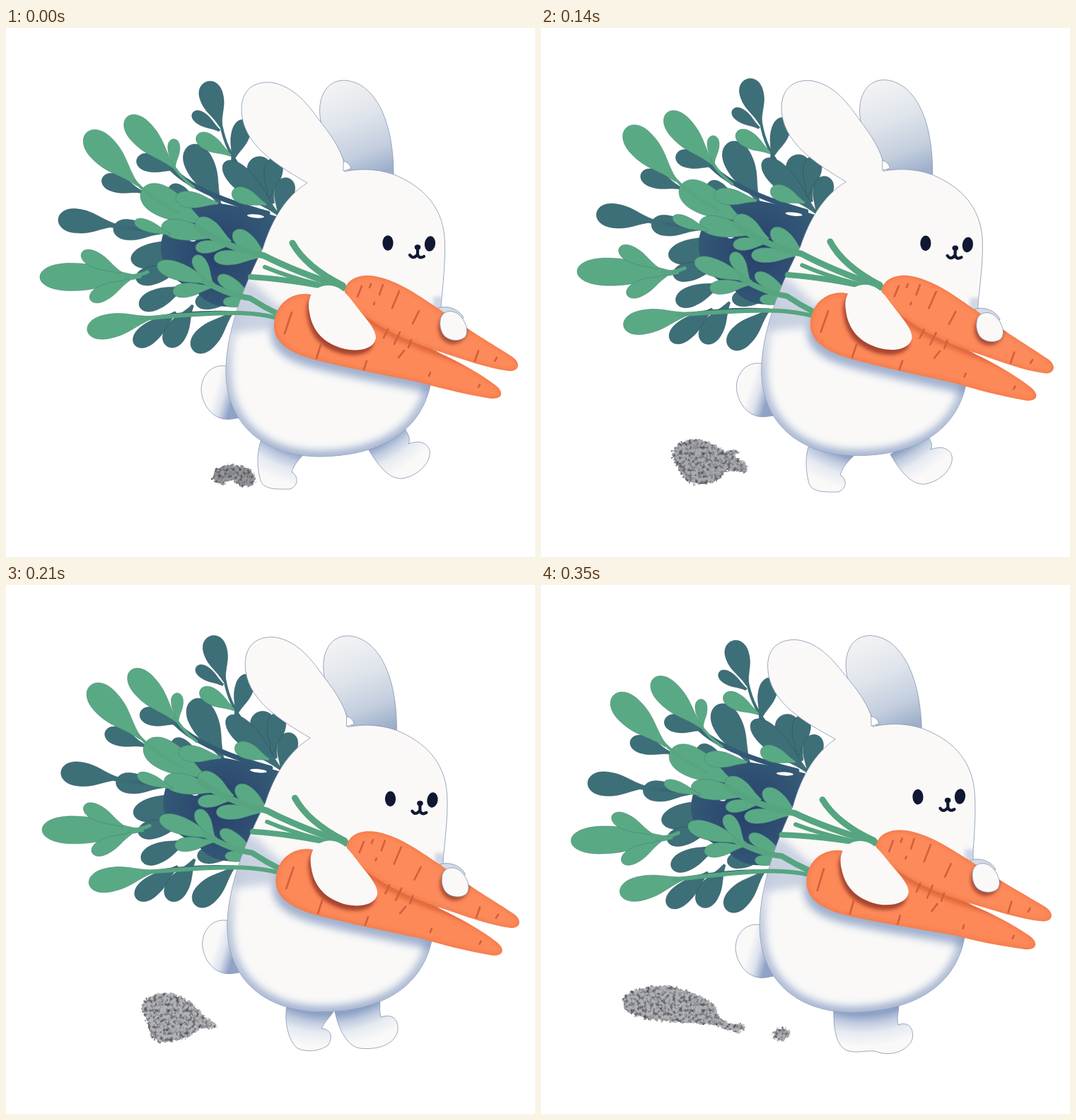
An HTML page for the animation above (420 ms loop, 748x748 px).

```html
<!DOCTYPE html>
<html lang="en">
<head>
<meta charset="utf-8">
<title>Bunny with carrots</title>
<style>
  html, body { margin: 0; width: 100%; height: 100%; overflow: hidden; background: #fff; }
  svg { display: block; width: 100vw; height: 100vh; }
  .edge { stroke: #8592ac; stroke-width: .8; }
  .mark { fill: none; stroke: #d0603c; stroke-width: 2.6; stroke-linecap: round; }
  .stem { fill: none; stroke-linecap: round; }
</style>
</head>
<body>
<svg viewBox="0 0 748 748">
  <defs>
    <radialGradient id="dark" gradientUnits="userSpaceOnUse" cx="300" cy="318" r="150">
      <stop offset="0" stop-color="#293f6d"/>
      <stop offset=".45" stop-color="#315474"/>
      <stop offset="1" stop-color="#3d6f78"/>
    </radialGradient>
    <radialGradient id="light" gradientUnits="userSpaceOnUse" cx="245" cy="225" r="130">
      <stop offset="0" stop-color="#4c9480"/>
      <stop offset=".35" stop-color="#57a581"/>
      <stop offset="1" stop-color="#5aa985"/>
    </radialGradient>
    <linearGradient id="earShade" gradientUnits="userSpaceOnUse" x1="470" y1="80" x2="520" y2="208">
      <stop offset="0" stop-color="#f2f2f4"/>
      <stop offset=".4" stop-color="#dfe4eb"/>
      <stop offset=".75" stop-color="#c3cede"/>
      <stop offset="1" stop-color="#9dafca"/>
    </linearGradient>
    <linearGradient id="tailShade" gradientUnits="userSpaceOnUse" x1="276" y1="508" x2="322" y2="522">
      <stop offset=".4" stop-color="#faf9f8"/>
      <stop offset=".7" stop-color="#dde3ed"/>
      <stop offset="1" stop-color="#8fa3c6"/>
    </linearGradient>
    <radialGradient id="legShade" gradientUnits="userSpaceOnUse" cx="455" cy="455" r="198">
      <stop offset=".77" stop-color="#8ea2c7"/>
      <stop offset=".83" stop-color="#bfcbdf"/>
      <stop offset=".9" stop-color="#e6eaf1"/>
      <stop offset="1" stop-color="#faf9f8"/>
    </radialGradient>
    <linearGradient id="rim" gradientUnits="userSpaceOnUse" x1="0" y1="380" x2="0" y2="600">
      <stop offset="0" stop-color="#9fb0ce" stop-opacity="0"/>
      <stop offset=".5" stop-color="#9fb0ce" stop-opacity=".75"/>
      <stop offset="1" stop-color="#9fb0ce"/>
    </linearGradient>
    <filter id="soft" x="-20%" y="-20%" width="140%" height="140%"><feGaussianBlur stdDeviation="6"/></filter>
    <filter id="softer" x="-20%" y="-20%" width="140%" height="140%"><feGaussianBlur stdDeviation="2.5"/></filter>
    <filter id="grain" x="-10%" y="-10%" width="120%" height="120%" color-interpolation-filters="sRGB">
      <feTurbulence type="fractalNoise" baseFrequency=".22" numOctaves="3" seed="4" result="n"/>
      <feDisplacementMap in="SourceGraphic" in2="n" scale="8" xChannelSelector="R" yChannelSelector="G" result="rough"/>
      <feColorMatrix in="n" values="0 0 0 0 .3  0 0 0 0 .3  0 0 0 0 .33  2.6 0 0 0 -1.1" result="specks"/>
      <feComposite in="specks" in2="rough" operator="in" result="dots"/>
      <feMerge><feMergeNode in="rough"/><feMergeNode in="dots"/></feMerge>
    </filter>
    <path id="bodyShape" d="M426 219C385 195 333 165 333 115C333 88 350 75 375 77C408 82 428 110 445 133C465 158 474 176 478 190L479 203C497 199 522 198 548 207C590 224 616 252 620 295C622 320 619 350 616 382C615 420 610 462 600 505C586 570 530 606 440 606C360 604 309 556 311 480C313 422 340 357 363 312C376 270 396 238 426 219Z"/>
    <path id="lowCarrot" d="M379 424C378 395 398 375 425 376C480 382 560 432 614 460C640 472 670 488 692 505C705 515 702 525 686 524C650 518 620 511 585 501C540 492 480 480 440 470C400 460 381 445 379 424Z"/>
    <path id="topCarrot" d="M479 372C481 355 500 347 522 351C558 358 588 382 612 397C650 425 690 448 716 465C729 474 725 486 712 485C680 481 648 469 614 458C580 447 540 430 515 412C495 399 477 390 479 372Z"/>
    <path id="arm" d="M429 402C424 377 438 363 458 364C476 366 485 380 495 393C505 407 523 424 523 438C520 458 487 459 467 450C442 440 432 421 429 402Z"/>
    <clipPath id="inBody"><use href="#bodyShape"/></clipPath>
    <clipPath id="inLow"><use href="#lowCarrot"/></clipPath>
    <clipPath id="inTop"><use href="#topCarrot"/></clipPath>
  </defs>

  <path id="dust" filter="url(#grain)"/>
  <path id="hind" class="edge" fill="url(#legShade)"/>
  <path id="fore" class="edge" fill="url(#legShade)"/>

  <g id="upper">
    <g id="leaves"></g>
    <path class="edge" fill="url(#tailShade)" d="M311 478C290 475 276 492 276 512C278 537 296 556 318 553L338 550L330 490Z"/>
    <path class="edge" fill="url(#earShade)" d="M446 136C438 104 450 74 478 74C522 76 549 132 548 212L490 215L478 188Z"/>
    <use href="#bodyShape" class="edge" fill="#faf9f8"/>
    <path class="edge" fill="#fff" d="M477 188Q486 190 488 199L477 202Z"/>
    <g clip-path="url(#inBody)">
      <use href="#bodyShape" fill="none" stroke="url(#rim)" stroke-width="16" filter="url(#soft)"/>
      <use href="#lowCarrot" x="-4" y="11" fill="#8298c0" opacity=".75" filter="url(#soft)"/>
      <path d="M300 345L350 360L392 400L382 425L318 432Z" fill="#a9b8d3" opacity=".6" filter="url(#soft)"/>
      <path d="M604 380L624 380L620 402L604 396Z" fill="#a9b8d3" opacity=".5" filter="url(#softer)"/>
    </g>

    <g fill="#0f1732">
      <ellipse cx="540" cy="304" rx="7.6" ry="10.8"/>
      <ellipse cx="599.500" cy="305" rx="7.6" ry="10.8" transform="rotate(8 599 305)"/>
      <ellipse cx="582" cy="310" rx="4.300" ry="3.700"/>
      <path d="M571 321Q576 328 582 320Q584 327 591 323M582 311V320" fill="none" stroke="#0f1732" stroke-width="4.200" stroke-linecap="round" stroke-linejoin="round"/>
    </g>

    <g id="stems" class="stem" stroke="#56a580"></g>

    <path class="edge" fill="#d3dbe7" d="M611 396C626 391 642 399 647 410L618 428Z"/>
    <use href="#lowCarrot" fill="#fd8858"/>
    <g clip-path="url(#inLow)">
      <use href="#lowCarrot" fill="none" stroke="#e8703f" stroke-width="4" opacity=".6" filter="url(#softer)"/>
      <use href="#topCarrot" x="-3" y="6" fill="#da6239" opacity=".75" filter="url(#softer)"/>
      <use href="#arm" x="-3" y="7" fill="#a8452f" filter="url(#softer)"/>
    </g>
    <use href="#topCarrot" fill="#fd8a5a"/>
    <g clip-path="url(#inTop)">
      <use href="#topCarrot" fill="none" stroke="#e8703f" stroke-width="4" opacity=".6" filter="url(#softer)"/>
      <ellipse cx="632" cy="424" rx="21" ry="23" fill="#b04c32" filter="url(#softer)"/>
    </g>
    <path class="mark" d="M404 402L394 432M445 448L439 467M540 426L534 438M557 430L549 447M563 456L555 466M510 471L506 483M573 441L569 452M600 487L598 492M670 504L668 508"/>
    <path class="mark" d="M503 365L497 380M516 362L514 367M533 363L528 377M521 388L520 391M556 372L546 396M584 400L575 418M668 456L663 471M694 466L691 471"/>
    <use href="#arm" fill="#faf9f8"/>
    <path class="edge" fill="#faf9f8" d="M614 414C615 400 630 397 640 405C651 415 655 430 649 437C640 445 624 442 618 433C615 428 613 422 614 414Z"/>
  </g>
</svg>

<script>
const $ = id => document.getElementById(id);

// base x, base y, tip x, tip y, width
const darkLeaves = [
  [304, 140, 284, 76, 33], [302, 145, 264, 120, 18], [320, 188, 338, 130, 26],
  [303, 250, 260, 166, 40], [378, 248, 352, 183, 36], [385, 264, 309, 190, 32],
  [372, 240, 381, 184, 26], [386, 268, 398, 212, 28], [240, 200, 185, 186, 25],
  [192, 232, 136, 213, 25], [156, 279, 74, 270, 34], [218, 290, 152, 283, 29],
  [300, 305, 177, 328, 36], [250, 340, 184, 355, 26], [255, 365, 189, 394, 28],
  [240, 402, 182, 448, 29], [264, 392, 228, 450, 31], [320, 402, 265, 456, 33],
  [330, 380, 268, 388, 24], [270, 245, 230, 226, 22]
];
const lightLeaves = [
  [186, 222, 114, 148, 40], [238, 198, 171, 126, 36], [238, 196, 237, 157, 17],
  [318, 180, 270, 152, 23], [282, 278, 192, 229, 42], [300, 296, 220, 280, 28],
  [232, 292, 182, 273, 16], [192, 352, 48, 352, 39], [162, 346, 107, 318, 22],
  [174, 356, 119, 384, 22], [208, 409, 115, 428, 34], [295, 362, 214, 334, 25],
  [292, 362, 267, 322, 20], [292, 366, 236, 373, 20], [318, 302, 269, 272, 25],
  [318, 306, 268, 311, 18], [370, 326, 322, 288, 24], [358, 324, 294, 325, 21],
  [350, 382, 300, 351, 19], [354, 388, 307, 387, 15], [368, 250, 320, 231, 23],
  [300, 248, 240, 240, 23]
];

function leaf([x, y, tx, ty, w]) {
  const l = Math.hypot(tx - x, ty - y), h = w / 2;
  const a = Math.atan2(ty - y, tx - x) * 180 / Math.PI;
  const d = `M0 -1.500C${l * .3} ${-h * .4} ${l * .4} ${-h} ${l * .7} ${-h}` +
    `C${l * 1.1} ${-h} ${l * 1.1} ${h} ${l * .7} ${h}C${l * .4} ${h} ${l * .3} ${h * .4} 0 1.500Z`;
  return `<path d="${d}" transform="translate(${x} ${y}) rotate(${a})"/>`;
}
const stem = (d, w) => `<path class="stem" d="${d}" stroke-width="${w}"/>`;

$("leaves").innerHTML =
  `<g fill="url(#dark)" stroke="#2d4b5c" stroke-width=".5">${darkLeaves.map(leaf).join("")}</g>
   <path fill="url(#dark)" d="M222 292C235 262 262 252 290 246C320 250 355 258 388 268L365 320L335 392C310 398 280 392 268 370C235 360 210 330 222 292Z"/>
   <g stroke="url(#dark)">
     ${stem("M303 130Q308 165 326 190", 4)}
     ${stem("M150 280Q190 285 240 290", 5)}
     ${stem("M185 228Q205 240 230 260", 4)}
     ${stem("M235 200Q270 235 370 262", 7)}
     ${stem("M205 410Q260 400 320 402", 4)}
   </g>
   <g fill="#fff"><ellipse cx="353" cy="266" rx="12" ry="2.500" transform="rotate(5 353 266)"/><ellipse cx="264" cy="299" rx="5" ry="3"/></g>
   <g fill="url(#light)" stroke="#3f7f70" stroke-width=".5">${lightLeaves.map(leaf).join("")}</g>
   <g stroke="#56a580">
     ${stem("M181 215Q200 238 245 262", 4)}
     ${stem("M235 192Q245 210 265 225", 4)}
     ${stem("M170 352Q190 350 200 345", 5)}
   </g>`;

$("stems").innerHTML =
  stem("M405 304Q424 338 476 364", 9) +
  stem("M270 282Q310 310 365 322Q410 345 478 367", 9) +
  stem("M346 352Q400 355 474 370", 8) +
  stem("M366 338Q400 352 440 362", 6) +
  stem("M280 358Q315 378 345 382Q365 395 386 405", 8) +
  stem("M192 411Q290 402 332 403Q360 404 384 410", 6);

const hindLeg = "M364 575C352 600 356 625 360 640C365 653 382 652 401 652C414 648 414 633 404 628C408 615 416 608 426 598Z";
const foreLeg = "M512 595C528 622 543 638 560 637C585 633 602 612 599 597C594 583 580 584 569 588C573 580 568 575 562 562Z";
const hindUnder = "M397 595C393 620 400 645 412 655C428 662 445 658 455 651C463 640 460 628 446 627C452 615 460 610 466 598Z";
const foreUnder = "M464 598C470 630 483 652 500 655C525 658 550 650 554 630C555 612 545 606 530 611C527 600 530 595 528 580Z";
const legsMet = "M414 590C413 625 416 650 432 658C450 664 465 655 478 661C500 667 520 656 525 642C528 625 518 617 505 622C502 610 507 603 506 585Z";

const puff = [
  "M291 634C294 622 308 616 325 618C340 618 352 628 352 638C352 650 340 649 330 648C324 637 312 638 308 646C298 644 290 640 291 634Z",
  "M238 598C250 592 268 596 280 603C300 607 322 615 323 628C322 640 305 641 292 638C275 640 258 646 245 642C230 640 228 625 237 615C240 608 234 603 238 598Z",
  "M185 605C186 588 205 580 225 582C240 586 250 590 258 599C270 597 278 595 280 600L272 604C285 610 294 618 290 628C280 630 268 624 260 628C255 642 235 648 215 644C200 640 196 625 190 617Z",
  "M191 600C192 585 212 575 232 577C250 581 262 590 271 599C278 608 290 616 299 624C290 630 280 624 270 630C262 640 245 644 225 648C208 645 200 635 202 622Z",
  "M139 600C141 582 158 571 178 572C200 579 225 582 243 596C255 606 265 618 269 630C258 636 245 630 230 630C210 624 190 631 170 629C150 622 140 612 139 600Z",
  "M115 588C120 572 150 565 185 567C210 575 235 582 247 596C248 608 255 616 270 620C282 618 290 622 288 628C280 635 265 632 255 626C240 618 225 622 205 620C180 615 150 618 130 607C118 602 114 595 115 588ZM328 634C330 625 345 624 352 632C350 640 342 648 336 645C332 640 326 640 328 634Z"
];

// lean: shift x, shift y, degrees; legs: path and offset
const back = [0, 0, -1.66];
const poses = [
  { lean: [0, 0, 0], hind: [hindLeg, 0, 0], fore: [foreLeg, 0, 0], tint: "#97989b" },
  { lean: back, hind: [hindLeg, 9, 2], fore: [foreLeg, -10, 4], tint: "#a3a4a8" },
  { lean: [-.25, -2.3, .98], hind: [hindLeg, 19, 4], fore: [foreLeg, -18, 8], tint: "#a9aaae" },
  { lean: [1.3, -3, .52], hind: [hindUnder, 0, 0], fore: [foreUnder, 0, 0], tint: "#b2b3b7" },
  { lean: back, hind: [hindUnder, 0, 0], fore: [foreUnder, 0, 0], tint: "#b0b1b5" },
  { lean: back, hind: [legsMet, 0, 0], fore: ["", 0, 0], tint: "#b0b1b5" }
];
const STEP = 70;

function setLeg(id, [d, dx, dy]) {
  $(id).setAttribute("d", d);
  $(id).setAttribute("transform", `translate(${dx} ${dy})`);
}

let shown = -1;
function show(i) {
  if (i === shown) return;
  shown = i;
  const { lean: [dx, dy, deg], hind, fore, tint } = poses[i];
  $("upper").setAttribute("transform", `translate(${dx} ${dy}) rotate(${deg} 385 545)`);
  setLeg("hind", hind);
  setLeg("fore", fore);
  $("dust").setAttribute("d", puff[i]);
  $("dust").setAttribute("fill", tint);
}

const start = performance.now();
function tick(now) {
  show(Math.floor(Math.max(0, now - start) / STEP) % poses.length);
  requestAnimationFrame(tick);
}
show(0);
requestAnimationFrame(tick);
</script>
</body>
</html>
```
